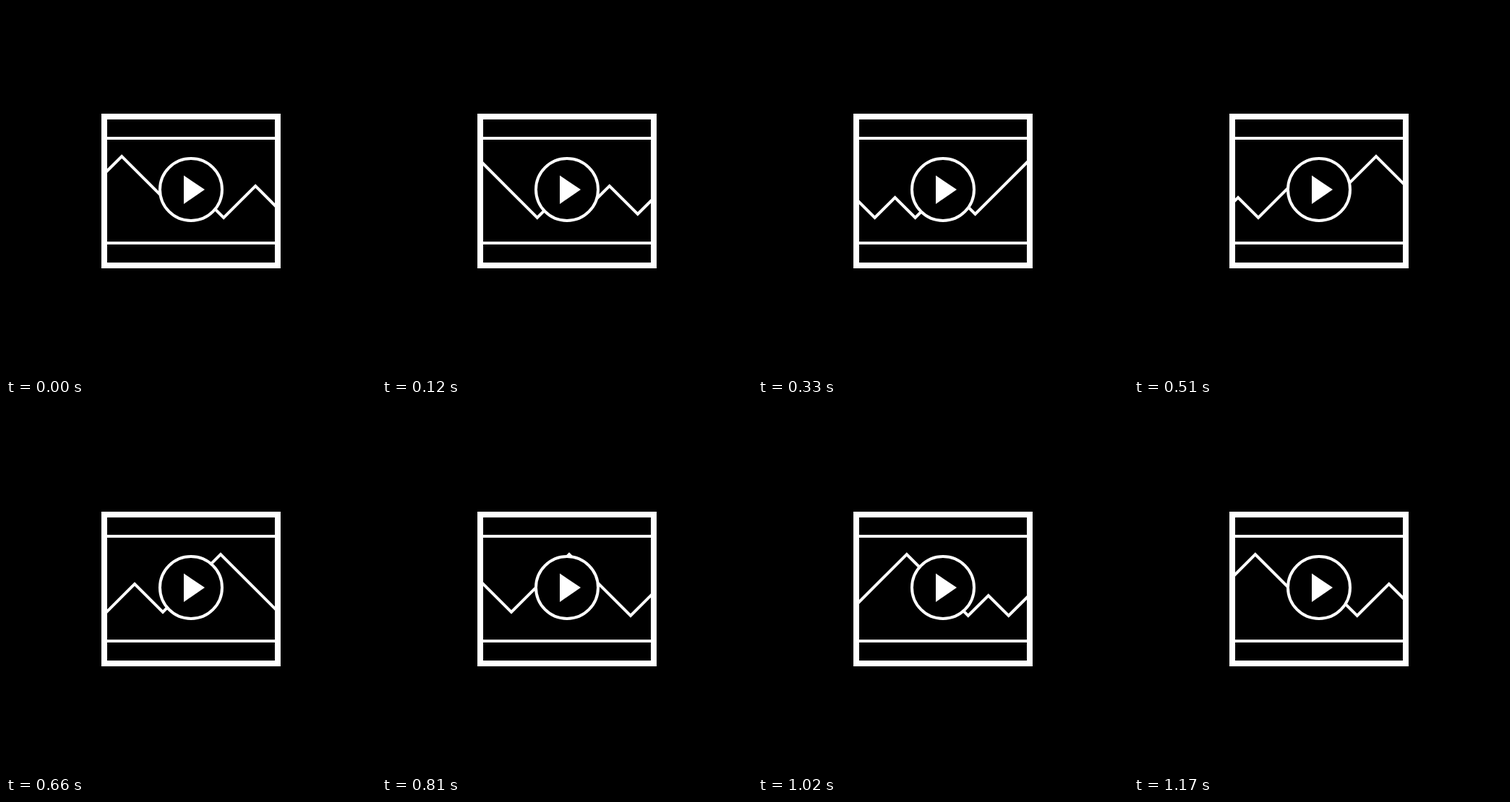
Recreate the animation shown at these times as an HTML page. Size 512 by 512 pixels, loop 1.2 s.

```html
<!DOCTYPE html>
<html lang="en">
<head>
<meta charset="utf-8">
<style>
  html, body { margin: 0; height: 100%; overflow: hidden; background: #000; }
  svg { display: block; }
</style>
</head>
<body>
<svg width="512" height="512" viewBox="0 0 512 512" stroke="#fff" stroke-width="4">
  <clipPath id="screen"><rect x="140" y="157" width="232" height="198"/></clipPath>
  <g clip-path="url(#screen)"><path id="ridge" fill="none"/></g>
  <path d="M136 183H376M136 328H376"/>
  <rect x="136" y="153" width="240" height="206" fill="none" stroke-width="8"/>
  <circle cx="256" cy="254" r="43"/>
  <path d="M246 234.5V274L275 254Z" fill="#fff" stroke="none"/>
</svg>
<script>
  const LOOP = 1200, STEP = 30, PERIOD = 304;
  const ridge = document.getElementById('ridge');
  const mountains = 'l85 85 28 -28 28 28 44 -44 39 39 80 -80';
  ridge.setAttribute('d', `M${160.2 - PERIOD} 208` + mountains.repeat(3));

  function draw() {
    const time = Math.floor(performance.now() % LOOP / STEP) * STEP;
    ridge.setAttribute('transform', `translate(${-PERIOD * time / LOOP})`);
    requestAnimationFrame(draw);
  }
  draw();
</script>
</body>
</html>
```
